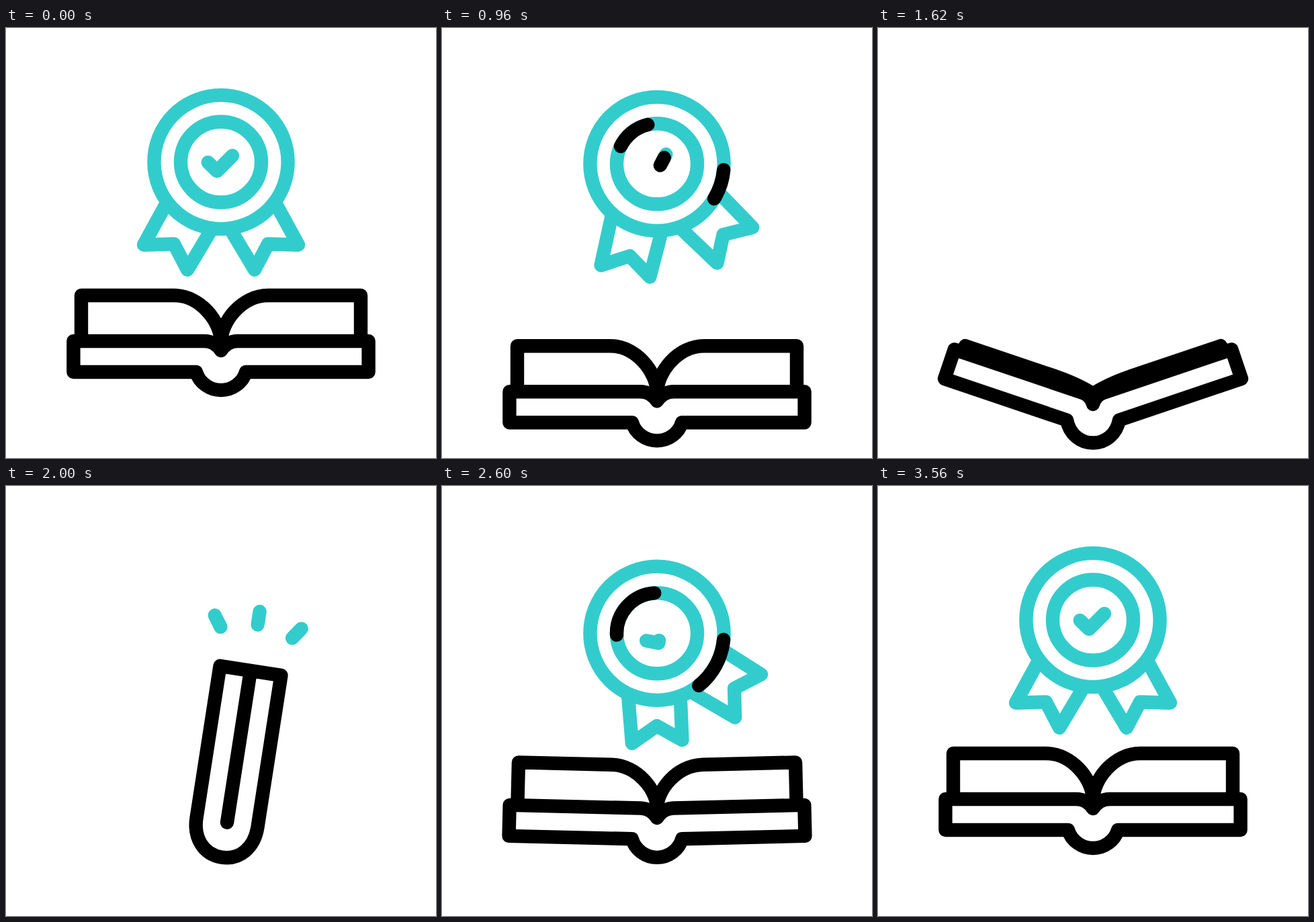
Write an HTML page that moves like this. It is 640 px wide and 640 px high and loops after 3600 ms.

```html
<!DOCTYPE html>
<html lang="en">
<head>
<meta charset="utf-8">
<title>Book and award</title>
<style>
html, body { margin: 0; width: 100%; height: 100%; overflow: hidden; background: #fff; }
svg { display: block; width: 100vw; height: 100vh; }
.line { stroke-width: 20.4; stroke-linecap: round; stroke-linejoin: round; }
.teal { stroke: #33cccc; }
.ink { stroke: #000; }
</style>
</head>
<body>
<svg viewBox="0 0 640 640">
  <defs><clipPath id="above"><rect id="slot" width="640" height="640"/></clipPath></defs>
  <g clip-path="url(#above)">
    <g id="medal" class="line teal" fill="none">
      <path id="ribL"/>
      <path id="ribR"/>
      <circle r="99.6" fill="#fff"/>
      <circle r="60"/>
      <path id="outer" class="ink"/>
      <path id="inner" class="ink"/>
      <path id="tick"/>
      <path id="tickInk" class="ink"/>
    </g>
  </g>
  <g id="book" class="line ink" fill="#fff">
    <path id="rays" class="teal" fill="none"/>
    <path id="pageL"/>
    <path id="pageR"/>
    <path id="cover"/>
  </g>
</svg>
<script>
const LOOP = 3600;
const el = {};
document.querySelectorAll('[id]').forEach(n => el[n.id] = n);

const set = (node, name, value) => node.setAttribute(name, value);
const mix = (a, b, f) => a + (b - a) * f;
const clamp = v => Math.min(1, Math.max(0, v));

// Smooth curve through [time, value] keys without overshoot.
function track(...keys) {
  const n = keys.length;
  const rate = i => (keys[i + 1][1] - keys[i][1]) / (keys[i + 1][0] - keys[i][0]);
  const slope = keys.map((k, i) => {
    if (i === 0 || i === n - 1) return 0;
    const a = rate(i - 1), b = rate(i);
    return a * b <= 0 ? 0 : 2 * a * b / (a + b);
  });
  return t => {
    if (t <= keys[0][0]) return keys[0][1];
    if (t >= keys[n - 1][0]) return keys[n - 1][1];
    let i = 0;
    while (t >= keys[i + 1][0]) i++;
    const h = keys[i + 1][0] - keys[i][0];
    const u = (t - keys[i][0]) / h, v = 1 - u;
    return v * v * (1 + 2 * u) * keys[i][1] + u * u * (3 - 2 * u) * keys[i + 1][1]
      + h * u * v * (v * slope[i] - u * slope[i + 1]);
  };
}

const medalY = track([0, 199.5], [540, 181.7], [600, 180.2], [640, 180.7], [900, 193],
  [1100, 246], [1260, 351.7], [1400, 510], [1520, 690], [2220, 690], [2400, 400],
  [2500, 290], [2600, 219.7], [2700, 186], [2800, 173], [2920, 181.3], [3200, 199.5]);
const spin = track([0, 0], [600, 20], [640, 19.5], [1260, -56.5], [1400, -62],
  [2300, -62], [2600, -33], [2920, -10], [3200, 14], [3560, 0]);

const left = {
  turn: track([0, 0], [620, 20.8], [640, 20.7], [1260, -58], [1400, -64], [2300, -64],
    [2600, -33.4], [2920, -16.7], [3240, 17.5], [3560, 0]),
  dx: track([0, 0], [640, -0.6], [1260, -3], [2600, 3.9], [2920, -1.6], [3260, 0]),
  dy: track([0, 0], [640, 0.3], [1260, 8], [2600, 3.9], [2920, 0], [3260, 0])
};
const right = {
  turn: track([0, 0], [620, 18.1], [640, 18], [1260, -52.8], [1400, -58], [2300, -58],
    [2600, -29], [2920, -24.6], [3260, 15], [3560, 0]),
  dx: track([0, 0], [640, 2], [1260, 2.9], [2600, 1.3], [2920, -5], [3260, 0]),
  dy: track([0, 0], [640, 1], [1260, 1.5], [2600, -1.3], [2920, 6], [3260, 0])
};

// Dark glints running round the rings: [tail, head] angles, going in and coming out.
const innerIn = [track([540, 0], [640, 30], [1000, 225], [1260, 329], [1280, 338]),
  track([480, 0], [640, 110], [1000, 270], [1260, 336], [1280, 338])];
const innerOut = [track([2420, 0], [2600, 177], [2920, 351], [2940, 359]),
  track([2350, 0], [2600, 266], [2920, 357], [2940, 359])];
const outerIn = [track([920, 0], [1260, 195.6], [1500, 360]),
  track([860, 0], [1260, 258], [1500, 360])];
const outerOut = [track([2560, -8], [2600, 5], [2920, 204], [3200, 360]),
  track([2500, -8], [2600, 50.7], [2920, 268], [3200, 360])];

const tickTail = track([610, 0], [640, 0.04], [1000, 0.7], [1260, 0.99]);
const tickHead = track([550, 0], [640, 0.28], [1000, 0.92], [1260, 1]);
const tickGrow = track([2440, 0], [2600, 0.44], [2920, 0.97], [3000, 1]);

const drop = track([440, 0], [540, 7], [640, 29], [1080, 84], [1260, 88.5], [1440, 92],
  [1640, 78], [1980, 19.5], [2000, 20], [2180, 68], [2600, 14], [2720, 7.7],
  [2920, 1.5], [3260, 0]);
const fold = track([1500, 0], [1640, 23], [1780, 72], [1880, 90], [2080, 90], [2160, 75],
  [2250, 45], [2350, 20], [2450, 8], [2600, 1.4], [2700, 0]);
const tilt = track([1860, 0], [2000, 8.8], [2140, 0]);
const rayHead = track([1830, 0], [2000, 0.97], [2040, 1]);
const rayTail = track([1880, 0], [2000, 0.58], [2100, 1]);

function turn([x, y], deg) {
  const a = deg * Math.PI / 180, c = Math.cos(a), s = Math.sin(a);
  return [c * x - s * y, s * x + c * y];
}
const fmt = p => p.map(v => v.toFixed(2)).join(' ');
const poly = pts => pts.length ? 'M' + pts.map(fmt).join('L') : '';

const RIBBON = [[8, 90], [50, 160.3], [70, 122], [115, 123.2], [75, 50]];
function ribbon(node, side, r, t) {
  const dx = r.dx(t), dy = r.dy(t), px = side * 17, py = 18;
  set(node, 'd', poly(RIBBON.map(([x, y]) => {
    const q = turn([side * x - px, y - py], r.turn(t));
    return [q[0] + px + dx, q[1] + py + dy];
  })));
}

function glint(node, r, [tail, head], t, from, to) {
  const a = tail(t), b = head(t);
  if (t < from || t > to || b - a < 0.2) return set(node, 'd', '');
  const p = turn([r, 0], a), q = turn([r, 0], b);
  set(node, 'd', `M${fmt(p)}A${r} ${r} 0 ${b - a > 180 ? 1 : 0} 1 ${fmt(q)}`);
}

const TICK = [[-19.3, 0.5], [-6, 13.5], [17, -9.5]];
const CORNER = 0.364;
function tickPart(a, b, deg) {
  if (b - a < 0.001) return '';
  const at = u => u < CORNER
    ? [0, 1].map(i => mix(TICK[0][i], TICK[1][i], u / CORNER))
    : [0, 1].map(i => mix(TICK[1][i], TICK[2][i], (u - CORNER) / (1 - CORNER)));
  const pts = [at(a)];
  if (a < CORNER && b > CORNER) pts.push(TICK[1]);
  pts.push(at(b));
  return poly(pts.map(p => turn(p, deg)));
}

function drawTick(t) {
  const deg = spin(t);
  let a = 0, b = 1, ink = '';
  if (t < 1280) {
    a = tickHead(t);
    if (t > 560) ink = tickPart(tickTail(t), Math.max(a, tickTail(t) + 0.002), deg);
  } else if (t < 2440) {
    b = 0;
  } else {
    b = tickGrow(t);
  }
  set(el.tick, 'd', tickPart(a, b, deg));
  set(el.tickInk, 'd', ink);
}

function drawMedal(t, spineY) {
  set(el.slot, 'height', spineY);
  set(el.medal, 'transform', `translate(320 ${medalY(t).toFixed(2)})`);
  set(el.medal, 'visibility', t > 1520 && t < 2220 ? 'hidden' : 'visible');
  ribbon(el.ribL, -1, left, t);
  ribbon(el.ribR, 1, right, t);
  const back = t > 1800;
  glint(el.inner, 60, back ? innerOut : innerIn, t, back ? 2350 : 480, back ? 2940 : 1280);
  glint(el.outer, 99.6, back ? outerOut : outerIn, t, back ? 2500 : 860, back ? 3200 : 1500);
  drawTick(t);
}

function drawBook(t, spineY) {
  const deg = fold(t), f = deg / 90, open = 1 - f;
  const flat = clamp(1 - deg / 22);
  const at = (side, x, y) => {
    const p = turn([-x, y], deg);
    return fmt([-side * p[0], p[1]]);
  };
  set(el.book, 'transform',
    `translate(320 ${spineY.toFixed(2)}) rotate(${tilt(t).toFixed(2)} 0 59)`);

  // The origin is the point where the two halves meet.
  const page = side => {
    const top = -14 * open - 68 * flat, low = -14 * open;
    const k = 31.3, x = 70;
    return `M${at(side, 208, low)}L${at(side, 208, top)}L${at(side, x, top)}`
      + `C${at(side, k, top)} ${at(side, 0, top + 38.7 * flat)} ${at(side, 0, low + 2 * flat)}`
      + `L0 0Z`;
  };
  set(el.pageL, 'd', page(-1));
  set(el.pageR, 'd', page(1));

  const end = 219.6 + 9 * f, top = -14 * open, low = 32 + 14 * f;
  const cx = mix(32.5, 46, f), cy = mix(48, 30, f);
  const bx = mix(16.6, 28, f), by = mix(59, 52.5, f);
  const L = (x, y) => at(-1, x, y), R = (x, y) => at(1, x, y);
  set(el.cover, 'd',
    `M0 0C${L(6 * open, -9 * open)} ${L(15 * open, top)} ${L(25 * open, top)}`
    + `L${L(end, top)}L${L(end, low)}L${L(37 * open, low)}`
    + `C${fmt([-cx, cy])} ${fmt([-bx, by])} ${fmt([0, by])}`
    + `C${fmt([bx, by])} ${fmt([cx, cy])} ${R(37 * open, low)}`
    + `L${R(end, low)}L${R(end, top)}L${R(25 * open, top)}`
    + `C${R(15 * open, top)} ${R(6 * open, -9 * open)} 0 0Z`);

  const a = rayTail(t), b = rayHead(t);
  const ray = (x0, y0, x1, y1) => poly([a, b].map(u => [mix(x0, x1, u), mix(y0, y1, u)]));
  const lit = t > 1830 && t < 2100 && b - a > 0.005;
  set(el.rays, 'd', lit
    ? ray(0, -268, 0, -319) + ray(-37, -262, -66, -303) + ray(37, -262, 66, -303) : '');
}

function draw(t) {
  const spineY = 480 + drop(t);
  drawMedal(t, spineY);
  drawBook(t, spineY);
}

const start = performance.now();
function tick(now) {
  draw(Math.max(0, now - start) % LOOP);
  requestAnimationFrame(tick);
}
draw(0);
requestAnimationFrame(tick);
</script>
</body>
</html>
```
